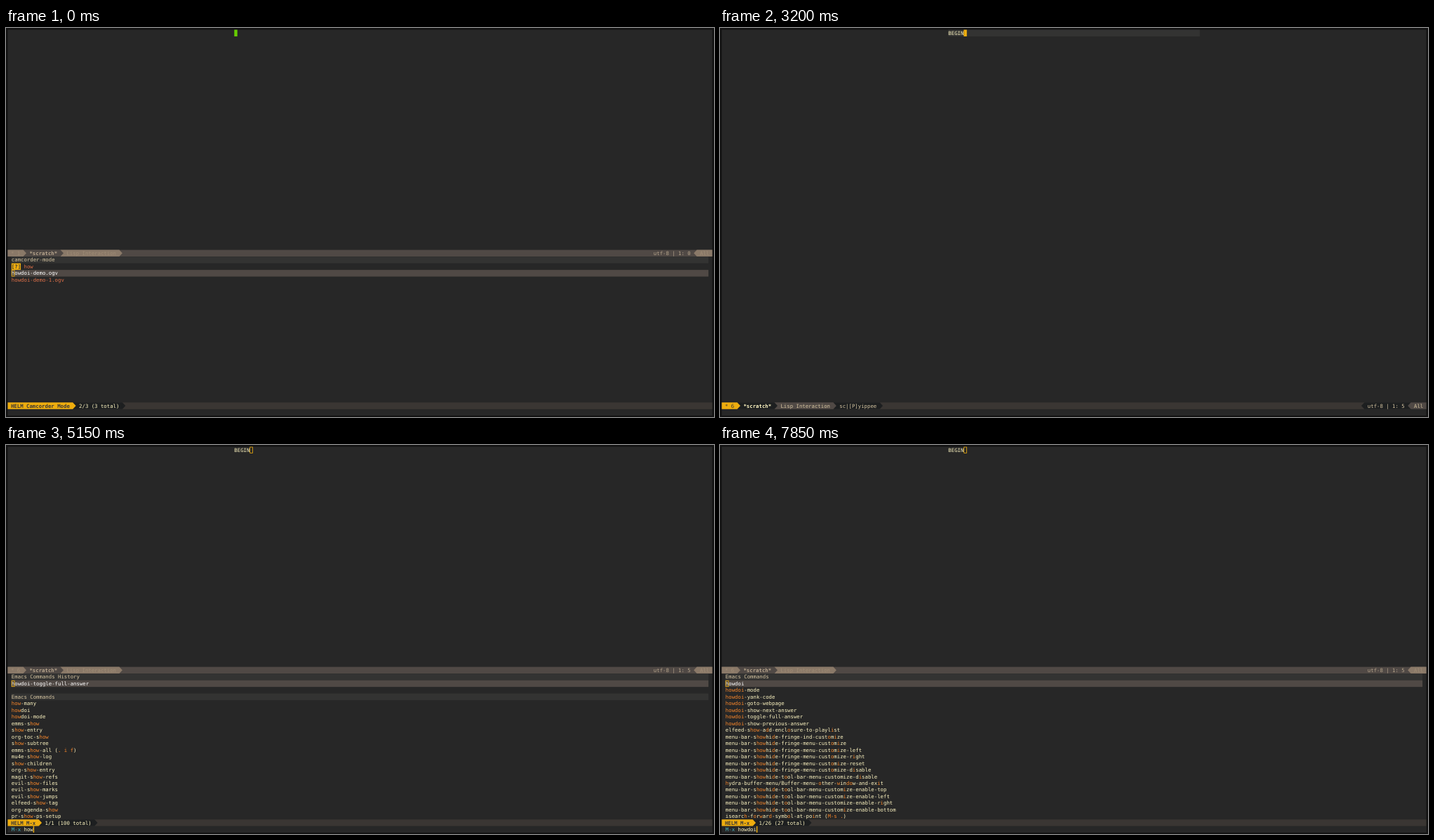
An HTML page with a canvas for the animation above (8 s loop, 1009 by 555 pixels).

```html
<!DOCTYPE html>
<html lang="en">
<head>
<meta charset="utf-8">
<title>Editor session</title>
<style>
  html, body { margin: 0; width: 100%; height: 100%; overflow: hidden; background: #121212; }
  canvas { display: block; width: 1009px; height: 555px; }
</style>
</head>
<body>
<canvas id="stage" width="1009" height="555"></canvas>
<script>
const ctx = document.getElementById('stage').getContext('2d');
const LOOP = 8000;
const CW = 4.415, RH = 9.476;               // character cell
const L = 2.5, R = 1006.5, TOP = 2.5, BOTTOM = 553;
const LIST_Y = 326.2, BAR_Y = 534.3, MINI_Y = 543.8;
const LIST_X = 7.8, LIST_R = 1001.5, BUF_X = 325.3;

const C = {
  frame: '#121212', bg: '#272727', line: '#333332', fg: '#fdf4c1', white: '#ffffff',
  dark: '#1d1f20', mid: '#504945', bar: '#3a3633', tan: '#8a7968', faint: '#9f8c76',
  dim: '#b5a48c', head: '#d5c4a1', match: '#f5852a', file: '#dd6f48',
  normal: '#eead0e', insert: '#66cd00', prompt: '#4fb3bf', ink: '#3c3836'
};

const HISTORY = ['helm-latexdiff-vc', 'helm-latexdiff-vc-range', 'howdoi-toggle-full-answer',
  'checkdoc', 'fill-paragraph (M-q)'];
const info = s => 'helm-info-' + s;
const H_CMDS = ['help-follow', ...['erc', 'ert', 'viper', 'gpgrt', 'libffi', 'gnutls'].map(info),
  'helm-select-xfont (C-x c F)', info('automake'), 'helm-configuration', 'helm-global-mark-ring',
  'hydra-buffer-menu/nil', info('gnutls-guile'), 'helm-swoop-caret-match'];
const HOW_CMDS = ('how-many|howdoi|howdoi-mode|emms-show|show-entry|org-toc-show|show-subtree|' +
  'emms-show-all (. i f)|mu4e-show-log|show-children|org-show-entry|magit-show-refs|' +
  'evil-show-files|evil-show-marks|evil-show-jumps|elfeed-show-tag|org-agenda-show|' +
  'pr-show-ps-setup').split('|');
const fringe = s => 'menu-bar-showhide-fringe-' + s;
const tool = s => 'menu-bar-showhide-tool-bar-menu-customize-' + s;
const HOWDOI_CMDS = ['howdoi',
  ...['mode', 'yank-code', 'goto-webpage', 'show-next-answer', 'toggle-full-answer',
    'show-previous-answer'].map(s => 'howdoi-' + s),
  'elfeed-show-add-enclosure-to-playlist', fringe('ind-customize'), fringe('menu-customize'),
  ...['left', 'right', 'reset', 'disable'].map(s => fringe('menu-customize-' + s)),
  tool('disable'), 'hydra-buffer-menu/Buffer-menu-other-window-and-exit',
  ...['top', 'left', 'right', 'bottom'].map(s => tool('enable-' + s)),
  'isearch-forward-symbol-at-point (M-s .)'];

function rect(x, y, w, h, color) {
  ctx.fillStyle = color;
  ctx.fillRect(x, y, w, h);
}

function hollow(x, y, color = C.normal) {
  ctx.strokeStyle = color;
  ctx.lineWidth = 0.8;
  ctx.strokeRect(x + 0.4, y + 0.5, CW - 0.6, RH - 1);
}

// color may be a function of the character index
function text(str, x, y, color, bold = false) {
  ctx.font = `${bold ? 'bold ' : ''}7.333px "DejaVu Sans Mono", monospace`;
  for (let i = 0; i < str.length; i++) {
    if (str[i] === ' ') continue;
    ctx.fillStyle = typeof color === 'function' ? color(i) : color;
    ctx.fillText(str[i], x + i * CW, y + 7.2);
  }
}

function arrow(x0, x1, tip, y, color) {
  ctx.fillStyle = color;
  ctx.beginPath();
  ctx.moveTo(x0, y);
  ctx.lineTo(x1, y);
  ctx.lineTo(tip, y + RH / 2);
  ctx.lineTo(x1, y + RH);
  ctx.lineTo(x0, y + RH);
  ctx.fill();
}

// segments: [text, background, foreground, bold], painted last to first so tips overlap
function modeLine(y, back, segments, right = []) {
  rect(L, y, R - L, RH, back);
  let x = L;
  const placed = segments.map(s => {
    const p = { s, x, end: x + (s[0].length + 2) * CW };
    x = p.end + CW;
    p.from = Math.max(L, p.x - CW);
    return p;
  });
  for (const p of placed.reverse()) {
    arrow(p.from, p.end, p.end + CW, y, p.s[1]);
    text(p.s[0], p.x + CW, y, p.s[2], p.s[3]);
  }
  for (const [str, tx, bg, fg] of right) {
    arrow(R, tx - CW, tx - 2 * CW, y, bg);
    text(str, tx, y, fg);
  }
}

const count = (times, t) => times.filter(k => t >= k).length;
const KEYS = [1450, 1700, 1850, 1950, 2100];
const QUERY = [4400, 4900, 5050, 5300, 5500, 5750];

const bufferAt = t => 'BEGIN'.slice(0, count(KEYS, t)) + (t >= 2650 && t < 2750 ? 'f' : '');
const queryAt = t => 'howdoi'.slice(0, count(QUERY, t));
const inserting = t => t >= 800 && t < 2750;

function matches(str, query) {
  const hit = new Set();
  if (!query) return hit;
  const at = str.indexOf(query);
  if (at >= 0) {
    for (let i = 0; i < query.length; i++) hit.add(at + i);
    return hit;
  }
  let pos = 0;
  for (let i = 0; i < query.length; i++) {
    const end = i === query.length - 1;
    const k = end ? str.lastIndexOf(query[i]) : str.indexOf(query[i], pos);
    if (k < pos) break;
    hit.add(k);
    pos = k + 1;
  }
  return hit;
}

function candidate(str, y, query) {
  const key = str.indexOf(' (');
  const hit = matches(key < 0 ? str : str.slice(0, key), query);
  const isKey = i => key >= 0 && i > key + 1 && i < str.length - 1;
  text(str, LIST_X, y, i => hit.has(i) || isKey(i) ? C.match : C.fg);
}

function header(str, y) {
  rect(LIST_X - 0.4, y, LIST_R - LIST_X, RH, C.line);
  text(str, LIST_X, y, C.head);
}

function selected(str, y) {
  rect(LIST_X - 0.4, y, LIST_R - LIST_X, RH, C.mid);
  text(str, LIST_X, y, C.white);
  hollow(LIST_X, y);
}

function idleModeLine(buf) {
  modeLine(316.6, C.mid, [
    ['* ' + (buf.length + 1), C.tan, C.faint],
    ['*scratch*', C.mid, C.dim, true],
    ['Lisp Interaction', C.tan, C.faint]
  ], [['All', 989, C.tan, C.faint]]);
  text('utf-8 | 1: ' + buf.length, 922.8, 316.6, C.dim);
}

function helmBar(title, total) {
  const segs = [['HELM ' + title, C.normal, C.ink, true]];
  if (total) segs.push([total, C.dark, C.fg]);
  modeLine(BAR_Y, C.bar, segs);
}

function camcorder() {
  rect(BUF_X, TOP, CW, RH, C.insert);
  idleModeLine('');
  const row = n => LIST_Y + n * RH;
  header('camcorder-mode', row(0));
  rect(LIST_X, row(1), 3 * CW, RH, C.normal);
  text('[?]', LIST_X, row(1), C.ink, true);
  text('how', LIST_X + 4 * CW, row(1), C.file);
  selected('howdoi-demo.ogv', row(2));
  text('howdoi-demo-1.ogv', LIST_X, row(3), C.file);
  helmBar('Camcorder Mode', '2/3 (3 total)');
}

function editing(t) {
  const buf = bufferAt(t), shown = bufferAt(t - 50);
  const x = BUF_X + buf.length * CW;
  rect(BUF_X, TOP, 358.5, RH, C.line);
  text(buf, BUF_X, TOP, C.fg);
  if (inserting(t)) rect(x, TOP, 1.4, RH, C.insert);
  else rect(x, TOP, CW, RH, C.normal);
  modeLine(BAR_Y, C.bar, [
    ['* ' + (shown.length + 1), inserting(t - 50) ? C.insert : C.normal, C.ink],
    ['*scratch*', C.dark, C.fg, true],
    ['Lisp Interaction', C.mid, C.head],
    ['sc|[P]yippee', C.dark, C.head]
  ], [
    ['utf-8 | 1: ' + shown.length, 922.8, C.dark, C.head],
    ['All', 989, C.mid, C.head]
  ]);
}

// sections of the command list for a query
function listing(query, t) {
  const n = query.length;
  if (n < 2) return { history: HISTORY, cmds: H_CMDS, total: n ? '1/5 (98 total)' : '1/5 (100 total)' };
  const history = [HISTORY[2]];
  if (n < 4) return { history, cmds: HOW_CMDS, total: '1/1 (100 total)' };
  return t < 6400
    ? { history, cmds: HOWDOI_CMDS, total: '1/1 (27 total)' }
    : { history: [], cmds: HOWDOI_CMDS, total: '1/26 (27 total)' };
}

function commands(t) {
  const query = queryAt(t), listed = queryAt(t - 50);
  text('BEGIN', BUF_X, TOP, C.fg);
  hollow(BUF_X + 5 * CW, TOP);
  idleModeLine('BEGIN');

  const ready = t >= 3500;
  const { history, cmds, total } = listing(listed, t);
  if (ready) {
    const rows = [];
    if (history.length) rows.push(['head', 'Emacs Commands History'], ...history.map(s => ['item', s]), ['gap', '']);
    rows.push(['head', 'Emacs Commands'], ...cmds.map(s => ['item', s]));
    rows.slice(0, 22).forEach(([kind, str], i) => {
      const y = LIST_Y + i * RH;
      if (kind === 'head') header(str, y);
      else if (i === 1) selected(str, y);
      else candidate(str, y, listed);
    });
  }
  helmBar('M-x', ready && total);
  rect(L, MINI_Y, R - L, BOTTOM - MINI_Y, C.bg);
  text('M-x', LIST_X, MINI_Y, C.prompt);
  text(query, LIST_X + 4 * CW, MINI_Y, C.fg);
  rect(LIST_X + (4 + query.length) * CW, MINI_Y, 1.4, BOTTOM - MINI_Y, C.normal);
}

function draw(t) {
  ctx.textBaseline = 'alphabetic';
  ctx.textRendering = 'geometricPrecision';
  rect(0, 0, 1009, 555, C.frame);
  rect(L, TOP, R - L, BOTTOM - TOP, C.bg);
  if (t < 200) camcorder();
  else if (t < 3400) editing(t);
  else commands(t);
}

const start = performance.now();
function tick(now) {
  draw(Math.max(0, now - start) % LOOP);
  requestAnimationFrame(tick);
}
draw(0);
requestAnimationFrame(tick);
</script>
</body>
</html>
```
